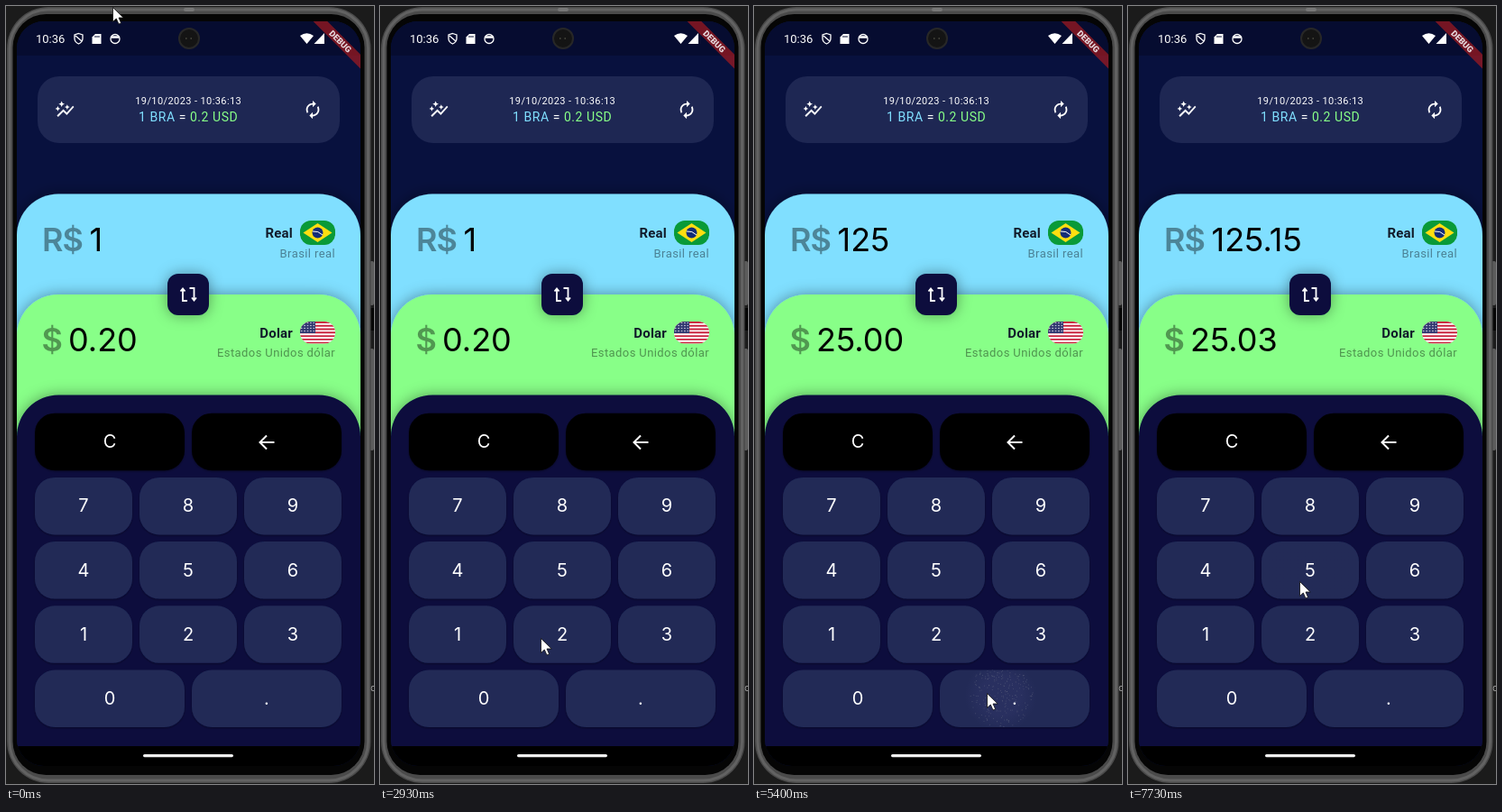
Write an HTML page that moves like this. It is 408 by 863 pixels and loops after 8 s.

```html
<!DOCTYPE html>
<html lang="pt">
<head>
<meta charset="utf-8">
<title>Currency converter</title>
<style>
html, body { margin: 0; width: 100%; height: 100%; overflow: hidden; background: #1b1b1b; }
svg { display: block; }
text { font-family: Roboto, sans-serif; }
.amount, .key { font-family: Inter, sans-serif; }
.amount { font-size: 36px; }
.unit { font-weight: 600; opacity: .4; letter-spacing: -1px; }
.key { font-size: 20px; fill: #fff; text-anchor: middle; }
.name { font-size: 15px; font-weight: 700; letter-spacing: .2px; text-anchor: end; fill: #111b2a; }
.detail { font-size: 13px; letter-spacing: .4px; text-anchor: end; opacity: .42; }
.mid { text-anchor: middle; fill: #fff; }
.line { fill: none; stroke: #fff; }
</style>
</head>
<body>
<svg width="408" height="863" viewBox="0 0 408 863">
  <defs>
    <clipPath id="screen"><rect x="12" y="17" width="381" height="826" rx="30"/></clipPath>
    <clipPath id="brClip"><rect x="326" y="238" width="39" height="27" rx="12"/></clipPath>
    <clipPath id="usClip"><rect x="326" y="350" width="39" height="24.5" rx="12"/></clipPath>
    <clipPath id="keyClip"><rect id="keyClipRect" rx="22"/></clipPath>
    <radialGradient id="glow">
      <stop offset=".55" stop-color="#7a70cc"/>
      <stop offset="1" stop-color="#7a70cc" stop-opacity="0"/>
    </radialGradient>
    <pattern id="stars" x="326" y="350" width="3.4" height="3" patternUnits="userSpaceOnUse">
      <circle cx="1.7" cy="1.5" r=".65" fill="#fff"/>
    </pattern>
    <filter id="shadow" x="-50%" y="-50%" width="200%" height="200%">
      <feDropShadow dx="0" dy="0" stdDeviation="8" flood-opacity=".38"/>
    </filter>
    <filter id="keyShadow" x="-10%" y="-10%" width="120%" height="130%">
      <feDropShadow dx="0" dy="1" stdDeviation="1" flood-opacity=".35"/>
    </filter>
  </defs>

  <!-- device body -->
  <rect width="408" height="863" fill="#1b1b1b"/>
  <g fill="#5c5c5c">
    <rect x="403" y="283" width="5" height="49" rx="2"/>
    <rect x="403" y="380" width="5" height="113" rx="2"/>
  </g>
  <rect x="404" y="335" width="4" height="25" fill="#050505"/>
  <text x="404" y="760" font-size="11" fill="#aaa">c</text>
  <rect x="1" y="1" width="403.500" height="861" rx="46" fill="#4a4a4a"/>
  <rect x="4" y="4" width="397.500" height="855" rx="43" fill="none" stroke="#626262" stroke-width="3"/>
  <rect x="7.500" y="9" width="390" height="844" rx="37" fill="#050505"/>
  <rect x="197" y="2" width="12" height="4" rx="2" fill="#777"/>

  <g clip-path="url(#screen)">
    <rect x="12" y="17" width="381" height="826" fill="#08113e"/>
    <rect x="12" y="17" width="381" height="38" fill="#060c30"/>

    <!-- status bar -->
    <text x="33" y="41" font-size="13" fill="#fff">10:36</text>
    <g class="line" stroke-width="1.300">
      <path d="M80.500 30.500L85 32v4q0 4-4.500 6q-4.500-2-4.500-6v-4zM77 33l7 6"/>
      <circle cx="121" cy="36.500" r="5"/>
      <path d="M116.500 34.500h9" stroke-width="2.500"/>
    </g>
    <path d="M99 31h6.500v11h-10v-7.500z" fill="#fff"/>
    <path d="M99 33v2m2-2v2m2-2v2" stroke="#070d30"/>
    <path d="M326 33q7.500-5.500 15 0l-7.500 9zM341.500 42h11.500v-12z" fill="#fff"/>
    <circle cx="203" cy="36" r="11" fill="#141414" stroke="#272727" stroke-width="2"/>
    <path d="M199 36h1.500m4 0h1.500" stroke="#4b4b40" stroke-width="1.500"/>

    <!-- rate card -->
    <rect x="35" y="78" width="335" height="74" rx="24" fill="#1e2753"/>
    <path fill="#fff" transform="translate(53.600 103.500) scale(.95)" d="M14.060 9.940L12 9l2.060-.94L15 6l.94 2.060L18 9l-2.060.94L15 12zM4 14l.94-2.060L7 11l-2.060-.94L4 8l-.94 2.060L1 11l2.060.94zM8.500 9l1.090-2.410L12 5.500 9.590 4.410 8.500 2 7.410 4.410 5 5.500l2.410 1.090zM4.500 20.500l6-6 4 4L23 8.930l-1.410-1.410-7.090 7.970-4-4L3 19z"/>
    <path fill="#fff" transform="translate(329 104) scale(.92)" d="M12 6v3l4-4-4-4v3c-4.420 0-8 3.580-8 8 0 1.570.46 3.030 1.240 4.260L6.700 14.800C6.250 13.970 6 13.010 6 12c0-3.310 2.690-6 6-6zm6.760 1.740L17.300 9.200c.44.84.7 1.790.7 2.800 0 3.310-2.690 6-6 6v-3l-4 4 4 4v-3c4.420 0 8-3.580 8-8 0-1.570-.46-3.030-1.240-4.260z"/>
    <text class="mid" x="202.200" y="108.500" font-size="11" letter-spacing=".4">19/10/2023 - 10:36:13</text>
    <text class="mid" x="202.200" y="128" font-size="14" letter-spacing=".55"><tspan fill="#80dfff">1 BRA</tspan> = <tspan fill="#88ff88">0.2 USD</tspan></text>

    <!-- currency panels -->
    <rect x="12" y="208.500" width="381" height="270" rx="46" fill="#80dfff" filter="url(#shadow)"/>
    <path d="M12 480V366a46 46 0 0 1 46-46H347a46 46 0 0 1 46 46V480z" fill="#88ff88" filter="url(#shadow)"/>
    <path d="M12 822V477.500a46 46 0 0 1 46-46H347a46 46 0 0 1 46 46V822z" fill="#08113e" filter="url(#shadow)"/>
    <text class="amount unit" x="40" y="272">R$</text>
    <text class="amount" id="from" x="92.500" y="272"></text>
    <text class="amount unit" x="39.500" y="383">$</text>
    <text class="amount" id="to" x="69" y="383"></text>
    <text class="name" x="318" y="256.500">Real</text>
    <text class="detail" x="365" y="278.500">Brasil real</text>
    <text class="name" x="318" y="367.500">Dolar</text>
    <text class="detail" x="365" y="388.500">Estados Unidos dólar</text>

    <g clip-path="url(#brClip)">
      <rect x="326" y="238" width="39" height="27" fill="#099a38"/>
      <path d="M329.500 251.500l16-10.500 16 10.500-16 10.500z" fill="#fede10"/>
      <circle cx="345.500" cy="251.500" r="6" fill="#142d77"/>
      <path d="M340 250q6-1 11 4" stroke="#fff" fill="none"/>
    </g>
    <g clip-path="url(#usClip)">
      <rect x="326" y="350" width="39" height="25" fill="#fff"/>
      <path id="stripes" stroke="#c9243f" stroke-width="1.900"/>
      <rect x="326" y="350" width="17" height="13" fill="#2f356f"/>
      <rect x="326" y="350" width="17" height="13" fill="url(#stars)"/>
    </g>

    <rect x="179" y="297" width="46" height="46" rx="12" fill="#08113e" filter="url(#shadow)"/>
    <path class="line" stroke-width="1.800" d="M201 327h-5v-13.500m-2.500 3l2.500-3 2.500 3M203.500 313h5v13.500m-2.500-3l2.500 3 2.500-3"/>

    <g id="keys"></g>
    <g clip-path="url(#keyClip)">
      <g id="ripple"><circle r="1" fill="url(#glow)" opacity=".08"/><g id="sparks"></g></g>
    </g>
    <g id="labels"></g>
    <path class="line" stroke-width="2" d="M297.500 484h-15.500m7-7.500l-7.500 7.500 7.500 7.500"/>

    <rect x="12" y="821" width="381" height="22"/>
    <rect x="152" y="830" width="100" height="3.200" rx="1.600" fill="#f2f2f2"/>

    <path d="M340.600 17h15.700L393 53.700v15.700z" fill="#b71c1c" opacity=".63"/>
    <text class="mid" transform="translate(370.700 39.300) rotate(45)" y="3.300" font-size="9.500" font-weight="900" style="fill:#e6d8dc">DEBUG</text>
  </g>

  <path id="cursor" d="M.5.5V16.500L4.300 13l2.700 6 2.600-1.100-2.600-5.900h5.200z" fill="#fff" stroke="#111" stroke-width=".8"/>
</svg>
<script>
const LOOP = 8000, STEP = 1000 / 15;
const $ = id => document.getElementById(id);

function add(parent, tag, attrs, text = '') {
  const el = document.createElementNS('http://www.w3.org/2000/svg', tag);
  set(el, attrs);
  el.textContent = text;
  parent.append(el);
}
function set(el, attrs) {
  for (const name in attrs) el.setAttribute(name, attrs[name]);
}

// keypad
const keys = {};
['C←', '789', '456', '123', '0.'].forEach((row, r) => {
  const width = row.length === 2 ? 166 : 108;
  [...row].forEach((label, c) => {
    const box = { x: 32 + c * (width + 8), y: 451.7 + r * 71.2, width, height: 63.5 };
    keys[label] = box;
    add($('keys'), 'rect', { ...box, rx: 22, fill: r ? '#202957' : '#030305', filter: 'url(#keyShadow)' });
    if (label !== '←') {
      add($('labels'), 'text', { class: 'key', x: box.x + width / 2, y: box.y + 38.5 }, label);
    }
  });
});

let stripes = '';
for (let i = 0; i < 7; i++) stripes += `M326 ${351 + i * 3.77}h39`;
set($('stripes'), { d: stripes });

// sparkles scattered in a unit disc
let seed = 7;
const random = () => (seed = seed * 16807 % 2147483647) / 2147483647;
for (let i = 0; i < 240; i++) {
  const angle = random() * 2 * Math.PI, dist = Math.sqrt(random()) * .9;
  add($('sparks'), 'circle', {
    cx: Math.cos(angle) * dist, cy: Math.sin(angle) * dist, r: .013, fill: '#8b8f9c', opacity: .5
  });
}

// time, x, y
const path = [
  [0, 118, 1], [1267, 118, 1], [1467, 142, 170], [1667, 168, 520], [1867, 134, 700],
  [1933, 130, 709], [2070, 130, 709], [2200, 126, 713], [2400, 126, 713], [2933, 178, 701],
  [3200, 178, 701], [3467, 208, 693], [3800, 208, 693], [4067, 216, 641], [4333, 216, 625],
  [4733, 216, 625], [5133, 274, 740], [5333, 258, 762], [5600, 258, 762], [5933, 156, 702],
  [6133, 138, 696], [6467, 138, 696], [6800, 189.5, 638], [LOOP, 189.5, 638]
];
// press time, key, tap x, tap y
const taps = [
  [3533, '2', 208, 693], [4533, '5', 216, 625], [5333, '.', 258, 762],
  [6267, '1', 138, 696], [7200, '5', 190, 638]
];
const amounts = [
  [0, '1', '0.20'], [3733, '12', '2.40'], [4667, '125', '25.00'],
  [5533, '125.', '25.00'], [6400, '125.1', '25.02'], [7333, '125.15', '25.03']
];
const latest = (rows, t) => rows.findLast(row => row[0] <= t);

function cursorAt(t) {
  const i = Math.max(1, path.findIndex(p => p[0] > t));
  const [t0, x0, y0] = path[i - 1], [t1, x1, y1] = path[i];
  const k = (t - t0) / (t1 - t0);
  return [x0 + (x1 - x0) * k, y0 + (y1 - y0) * k].map(Math.round);
}

function drawRipple(t) {
  const tap = latest(taps, t);
  const age = tap ? t - tap[0] : LOOP;
  const fade = Math.max(0, Math.min(1, (600 - age) / 300));
  set($('ripple'), { opacity: fade });
  if (!fade) return;
  const box = keys[tap[1]];
  const x = (tap[2] + box.x + box.width / 2) / 2;
  const y = (tap[3] + box.y + box.height / 2) / 2;
  set($('keyClipRect'), box);
  set($('ripple'), { transform: `translate(${x} ${y}) scale(${16 + age * .35})` });
  set($('sparks'), { opacity: Math.max(0, 1 - age / 220) });
}

function render(now) {
  const t = Math.floor((now % LOOP + 4) / STEP) * STEP + 1;
  const [, from, to] = latest(amounts, t);
  $('from').textContent = from;
  $('to').textContent = to;
  set($('cursor'), { transform: `translate(${cursorAt(Math.min(t, LOOP - 1))})` });
  drawRipple(t);
}

const start = performance.now();
function tick() {
  render(performance.now() - start);
  requestAnimationFrame(tick);
}
tick();
</script>
</body>
</html>
```
